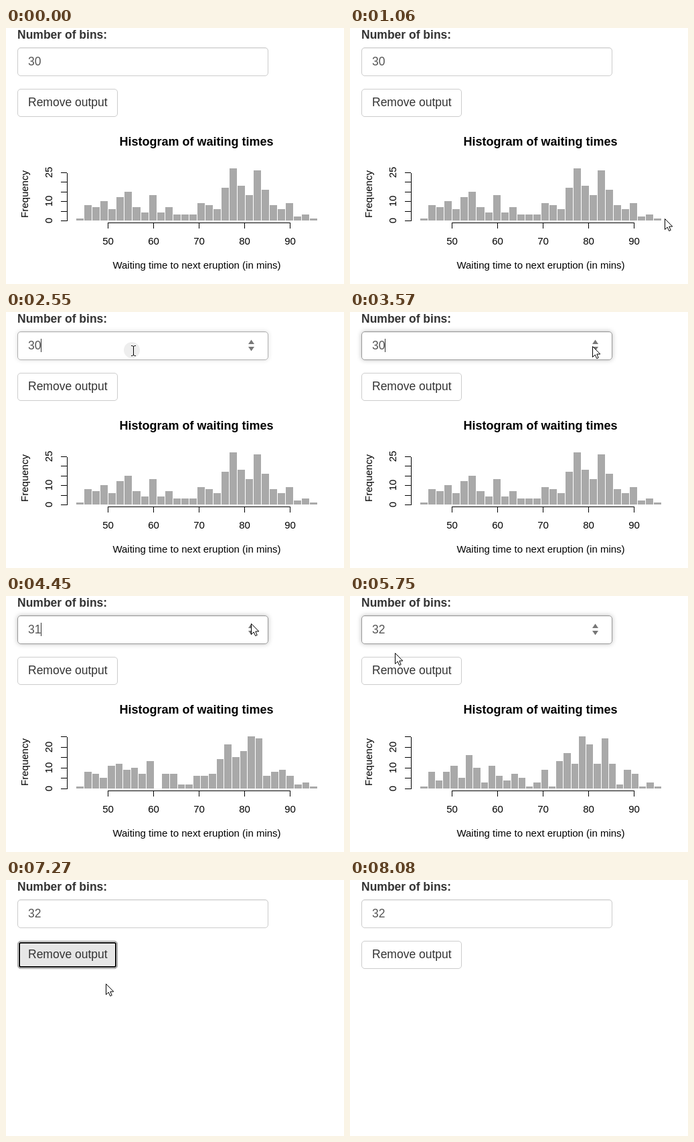
Recreate the animation shown at these times as an HTML page. Size 505 px wide and 383 px high, loop 8.21 s.

```html
<!DOCTYPE html>
<html lang="en">
<head>
<meta charset="utf-8">
<title>Histogram with a number of bins</title>
<style>
html, body { margin: 0; width: 100%; height: 100%; overflow: hidden; background: #fff; }
.box { position: absolute; left: 17px; box-sizing: border-box; border: 1px solid #ccc; border-radius: 5px; }
#field { top: 29px; width: 375px; height: 43px; }
#button { top: 91px; width: 150px; height: 42px; }
svg { position: absolute; left: 0; top: 0; font: 15px "Liberation Sans", Arial, sans-serif; }
.ui { font-size: 17.5px; fill: #333; }
.bold { font-weight: bold; }
.mid { text-anchor: middle; }
.axis { fill: none; stroke: #000; }
.bar { fill: #a9a9a9; stroke: #fff; }
.axis, .bar, #caret { shape-rendering: crispEdges; }
</style>
</head>
<body>
<div id="field" class="box"></div>
<div id="button" class="box"></div>
<svg width="505" height="383">
  <text class="ui bold" x="17" y="16">Number of bins:</text>
  <text class="ui" id="value" x="33" y="56" style="fill:#555"></text>
  <text class="ui" x="33" y="117">Remove output</text>
  <path id="spinner" fill="#777" d="M362 48l4.5-6.5 4.5 6.5zM362 52h9l-4.5 6.5z"/>
  <path id="caret" stroke="#333" d="M52.5 40V60"/>
  <g id="plot"></g>
  <circle id="press" r="12" fill="#ddd" opacity=".5"/>
  <path id="cursor" stroke="#000" stroke-linejoin="round"/>
</svg>
<script>
const LOOP = 8210;
const $ = id => document.getElementById(id);
const show = (id, on) => $(id).style.display = on ? "" : "none";
const clamp = v => Math.min(1, Math.max(0, v));
const within = (t, spans) => spans.some(([a, b]) => t >= a && t < b);

// How often each waiting time from 43 to 96 minutes occurs
const times = [1,0,3,5,4,3,5,5,6,5,7,9,6,4,3,4,7,6,0,4,3,4,3,2,1,1,2,
  4,5,1,7,6,8,9,12,15,10,8,13,12,14,10,6,6,2,6,3,6,1,1,2,1,0,1];

const px = minutes => 152.5 + (minutes - 50) * 6.8;
const label = (text, x, y, extra = "") =>
  `<text class="mid" x="${x}" y="${y}" ${extra}>${text}</text>`;
const upright = (text, x, y) => label(text, 0, 0, `transform="translate(${x} ${y}) rotate(-90)"`);

function histogram(bins) {
  const width = 53 / bins, counts = Array(bins).fill(0);
  times.forEach((n, i) => counts[Math.max(0, Math.ceil(i / width - 1e-9) - 1)] += n);
  const unit = 78 / Math.max(...counts);
  const py = n => Math.round(288 - n * unit);

  let out = label("Histogram of waiting times", 284.5, 176, 'style="font-size:18px;font-weight:bold"')
    + label("Waiting time to next eruption (in mins)", 285, 360)
    + upright("Frequency", 33, 248.5);
  counts.forEach((n, i) => {
    if (n) out += `<rect class="bar" x="${px(43 + i * width)}" y="${py(n) - .5}"
      width="${width * 6.8}" height="${288 - py(n) + .5}"/>`;
  });
  let axes = `M152.5 291.5H424.5M91.5 288.5V${py(25) + .5}`;
  for (let m = 50; m <= 90; m += 10) {
    axes += `M${Math.floor(px(m)) + .5} 291V300`;
    out += label(m, px(m), 324);
  }
  for (let n = 0; n <= 25; n += 5) axes += `M82 ${py(n) + .5}H91`;
  for (const n of [0, 10, bins === 30 ? 25 : 20]) out += upright(n, 69, py(n));
  return out + `<path class="axis" d="${axes}"/>`;
}

// Pointer moves: start, end, steps, x, y
const moves = [
  [720, 1260, 9, 470, 238],
  [1660, 2210, 9, 190, 58],
  [2880, 3640, 12, 365, 51],
  [3710, 3980, 4, 366, 41],
  [5270, 5750, 8, 67, 85],
  [5820, 5950, 3, 69, 112],
  [7270, 7410, 3, 376, 278],
  [7680, 7681, 1, 434, 331]
];

function pointer(t) {
  let x = 470, y = 379;
  moves.forEach(([start, end, steps, toX, toY], i) => {
    if (t < start) return;
    const k = (Math.floor(clamp((t - start) / (end - start)) * (steps - 1)) + 1) / steps;
    const e = i ? k * k * (3 - 2 * k) : k;
    x += (toX - x) * e;
    y += (toY - y) * e;
  });
  return [Math.round(x), Math.round(y)];
}

const shapes = {
  arrow: "M.5.5V16.5L4.2 13 6.7 18.6 9.2 17.5 6.8 12H11.8Z",
  beam: "M-3-7.5H-1.5L.5-6.5 2.5-7.5H4M.5-6.5V6.5M-3 7.5H-1.5L.5 6.5 2.5 7.5H4",
  hand: "M-1.6 13V1.8a1.6 1.6 0 0 1 3.2 0V7.5a1.5 1.5 0 0 1 2.6.6a1.4 1.4 0 0 1 2.4.8"
    + "a1.3 1.3 0 0 1 2.2 1V15q0 3-1.8 5v2.5H-.8v-2.5L-6 13.5q-1.2-2 .4-2.6 1.6-.4 4 2.1Z"
};

let drawn;
function draw(t) {
  const [x, y] = pointer(t);
  const visible = within(t, [[720, 7750]]);
  const onField = visible && x >= 17 && x < 392 && y >= 29 && y < 72;
  const onButton = visible && x >= 17 && x < 167 && y >= 91 && y < 133;

  // Number field
  const glow = clamp((t - 2480) / 130) - clamp((t - 6210) / 140);
  const shade = 204 - 51 * glow;
  $("field").style.borderColor = `rgb(${shade},${shade},${shade})`;
  $("field").style.boxShadow =
    `inset 0 1px 1px rgba(0,0,0,.075), 0 0 7px rgba(0,0,0,${.25 * glow})`;
  $("value").textContent = t < 4250 ? 30 : t < 4860 ? 31 : 32;
  show("spinner", within(t, [[2480, 6210]]) || (onField && t < 6210));
  show("caret", within(t, [[2480, 2950], [3450, 5360], [5860, 6210]]));

  // Button
  const down = within(t, [[6210, 6350]]), focus = within(t, [[6210, 8080]]);
  const style = $("button").style;
  style.background = down ? "#d4d4d4" : focus || onButton ? "#e6e6e6" : "#fff";
  style.borderColor = down || (focus && !onButton) ? "#8c8c8c" : onButton ? "#adadad" : "#ccc";
  style.boxShadow = focus
    ? "inset 0 0 0 1px #fff, inset 0 0 0 3px #101010" + (down ? ", inset 0 6px 6px rgba(0,0,0,.1)" : "")
    : "none";

  // Plot
  const bins = t < 4450 ? 30 : t < 4990 ? 31 : t < 6350 ? 32 : 0;
  if (bins !== drawn) {
    $("plot").innerHTML = bins ? histogram(bins) : "";
    drawn = bins;
  }

  // Pointer
  const kind = onButton ? "hand" : onField && x < 358 ? "beam" : "arrow";
  show("cursor", visible);
  $("cursor").setAttribute("d", shapes[kind]);
  $("cursor").setAttribute("fill", kind === "beam" ? "none" : "#fff");
  $("cursor").setAttribute("transform", `translate(${x} ${y})`);
  show("press", within(t, [[2410, 2610], [4180, 4390], [4790, 4990], [6210, 6350]]));
  $("press").setAttribute("transform", `translate(${x - 2} ${y - 1})`);
}

const begin = performance.now();
function tick() {
  draw((performance.now() - begin) % LOOP);
  requestAnimationFrame(tick);
}
tick();
</script>
</body>
</html>
```
